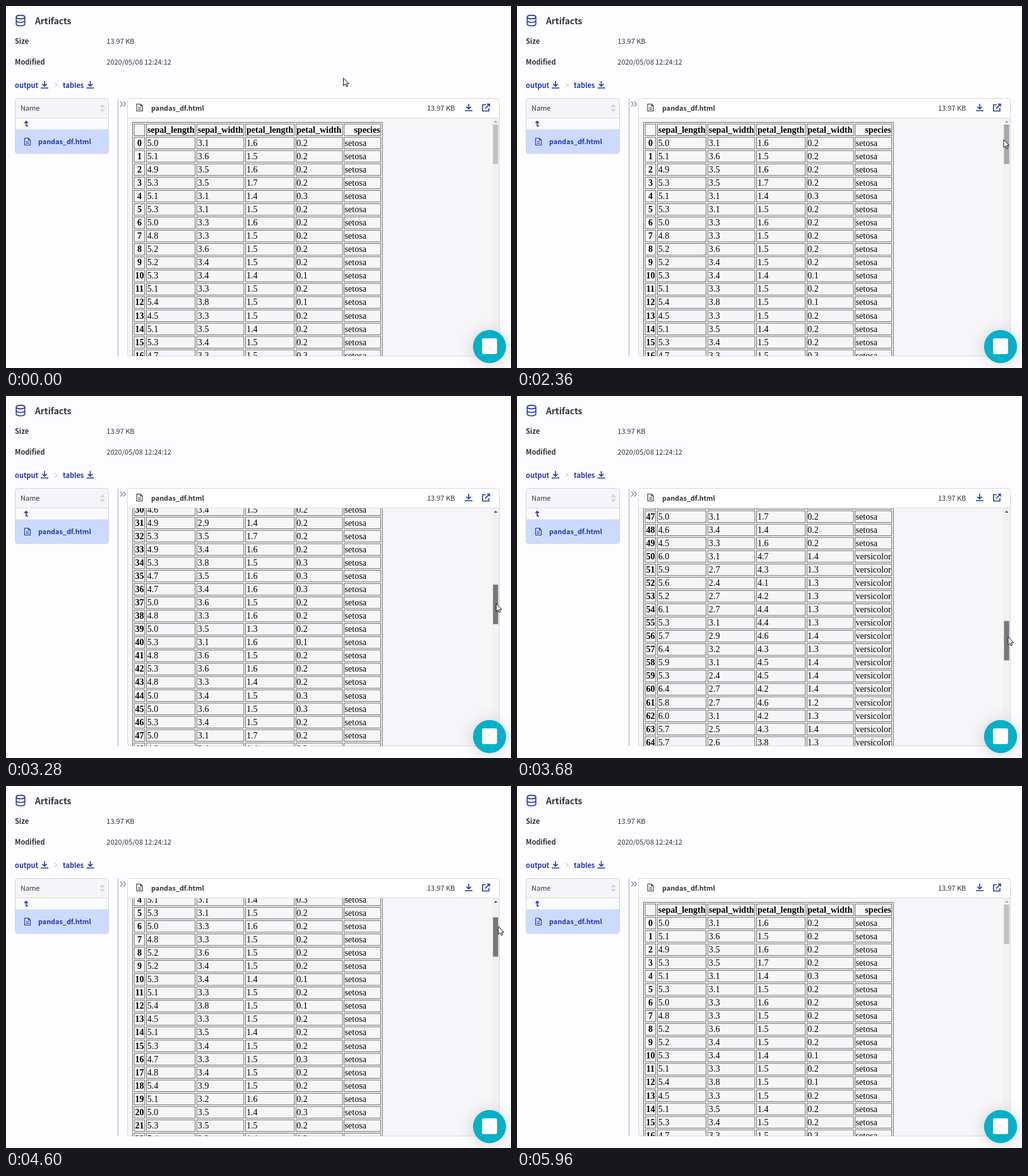
An HTML page that plays this animation: 800 px wide and 574 px high, repeating every 6000 ms.

```html
<!DOCTYPE html>
<html lang="en">
<head>
<meta charset="utf-8">
<title>Artifacts</title>
<style>
  html, body { margin: 0; width: 100%; height: 100%; overflow: hidden; background: #fdfdff; }
  body { position: relative; }
  svg { position: absolute; left: 0; top: 0; }
  text { font: 11px "Noto Sans CJK JP", "Noto Sans CJK SC", "Noto Sans CJK", "Noto Sans", sans-serif; fill: #33333b; }
  .bold { font-weight: 700; }
  .title { font-size: 13.8px; }
  .name { font-size: 10.8px; }
  .blue { fill: #2439ad; }
  .line { fill: none; stroke: #2439ad; stroke-width: 1.6; }
  .thin { stroke-width: 1.1; }
  .dark { stroke: #33333b; }
  #view { position: absolute; left: 193px; top: 178px; width: 577px; height: 377px; overflow: hidden; }
  table { position: absolute; left: 7.3px; top: 6px; transform-origin: 0 0; border: 1px solid #5c5c5c;
    border-spacing: 2px; font: 16px/18px "Liberation Serif", "Times New Roman", serif; color: #000; }
  th, td { border: 1px solid #5c5c5c; padding: 1px; white-space: nowrap; }
  thead th { text-align: right; }
</style>
</head>
<body>
<svg width="800" height="574">
  <defs>
    <path id="save" class="line" d="M0-6V2M-3.6-1.4 0 2.2 3.6-1.4M-6 5H6"/>
    <path id="file" d="M-4.5-5.5H1.5L4.5-2.5V5.5H-4.5ZM1.5-5.5V-2.5H4.5M-2.3 0H2.3M-2.3 2.6H2.3"/>
    <filter id="soft" x="-100%" y="-100%" width="300%" height="300%"><feGaussianBlur stdDeviation="13"/></filter>
  </defs>

  <g class="line">
    <ellipse cx="23" cy="17.5" rx="6.8" ry="2.9"/>
    <path d="M16.2 17.5V28.5C16.2 32.4 29.8 32.4 29.8 28.5V17.5M16.2 23C16.2 26.9 29.8 26.9 29.8 23"/>
  </g>
  <text x="46" y="28.5" class="bold title">Artifacts</text>
  <text x="14" y="60" class="bold">Size</text>
  <text x="159.3" y="60">13.97 KB</text>
  <text x="14" y="93" class="bold">Modified</text>
  <text x="159.3" y="93">2020/05/08 12:24:12</text>
  <text x="14" y="129.5" class="bold blue">output</text>
  <use href="#save" x="61" y="125"/>
  <path d="M77 122.5 81.5 125.5 77 128.5" fill="none" stroke="#b9b9c2"/>
  <text x="90" y="129.5" class="bold blue">tables</text>
  <use href="#save" x="133.5" y="125"/>

  <path d="M14.5 177.5V150.5Q14.5 146.5 18.5 146.5H158.5Q162.5 146.5 162.5 150.5V177.5Z" fill="#f5f5f7"/>
  <rect x="14.5" y="177.5" width="148" height="19" fill="#fafafc"/>
  <path d="M14.5 196H162.5V230Q162.5 234 158.5 234H18.5Q14.5 234 14.5 230Z" fill="#ccdaff"/>
  <rect x="14.5" y="146.5" width="148" height="87.5" rx="4" fill="none" stroke="#d3d3da"/>
  <path d="M14.5 177.5H162.5M14.5 196H162.5" stroke="#dcdce3"/>
  <text x="23" y="165.5">Name</text>
  <path d="M148.5 160.5 152.7 156 157 160.5ZM148.5 163.5 152.7 168 157 163.5Z" fill="#d2d2d8"/>
  <path class="line" d="M35 190.2H32V183M29.3 185.6 32 182.9 34.7 185.6"/>
  <use href="#file" x="34" y="215" class="line thin"/>
  <text x="51" y="219" class="bold name blue">pandas_df.html</text>

  <path d="M177.5 147V555" stroke="#aaaab0"/>
  <path d="M181 151.5 184.5 155.5 181 159.5M186 151.5 189.5 155.5 186 159.5" fill="none" stroke="#85858d" stroke-width="1.2"/>

  <rect x="192.5" y="146.5" width="589" height="408.5" rx="4" fill="#f6f6f8"/>
  <path d="M192.5 177.5V150.5Q192.5 146.5 196.5 146.5H777.5Q781.5 146.5 781.5 150.5V177.5Z" fill="#fff"/>
  <path d="M192.5 177.5H781.5" stroke="#dcdce2"/>
  <use href="#file" x="211.5" y="161" class="line thin dark"/>
  <text x="230" y="165.5" class="bold name">pandas_df.html</text>
  <text x="667" y="165.5">13.97 KB</text>
  <use href="#save" x="733" y="161"/>
  <path class="line" d="M760 156.5H755V166.5H765V162M759 162.5 766 155.5M762 155.5H766V159.5"/>

  <rect x="770" y="178" width="11" height="377" fill="#f1f1f2"/>
  <path id="up" d="M773 185 775.7 181.8 778.5 185Z"/>
  <rect id="thumb" x="771.5" width="8.2" height="62.5"/>
  <rect x="192.5" y="146.5" width="589" height="408.5" rx="4" fill="none" stroke="#d8d8de"/>

  <circle cx="766" cy="542" r="26" opacity=".17" filter="url(#soft)"/>
  <circle cx="766" cy="540" r="26.2" fill="#04b0c9"/>
  <rect x="754" y="527" width="24" height="25" rx="3" fill="#fff"/>
</svg>

<div id="view"><table></table></div>

<svg width="800" height="574">
  <path id="cursor" d="M0 0V12.5L2.9 9.8 4.8 14 6.8 13.1 5 9.1H8.8Z" fill="#fff" stroke="#111"/>
</svg>

<script>
const SCALE = 0.8776, LOOP = 6000, RATIO = 6.02;
const $ = id => document.getElementById(id);
const table = document.querySelector('table');

// mean and spread of each measured column
const setosa = { name: 'setosa', stats: [[5, .5], [3.4, .5], [1.5, .2], [.22, .1]] };
const versicolor = { name: 'versicolor', stats: [[5.9, .8], [2.8, .5], [4.3, .6], [1.3, .2]] };

let seed = 7;
const rand = () => (seed = seed * 16807 % 2147483647) / 2147483647;
const vary = ([mean, spread]) => (mean + (rand() + rand() - 1) * spread).toFixed(1);
const wrap = (tag, items) => items.map(s => `<${tag}>${s}</${tag}>`).join('');

function row(i) {
  const { name, stats } = i < 50 ? setosa : versicolor;
  return `<tr><th>${i}</th>${wrap('td', [...stats.map(vary), name])}</tr>`;
}

const heads = ['', 'sepal_length', 'sepal_width', 'petal_length', 'petal_width', 'species'];
table.innerHTML = `<thead><tr>${wrap('th', heads)}</tr></thead>
  <tbody>${Array.from({ length: 100 }, (_, i) => row(i)).join('')}</tbody>`;

// key points: time, then values
const pointer = [
  [700, 534.5, 114], [1320, 624, 300], [1960, 733, 260], [2360, 771, 212], [2520, 771, 212],
  [2920, 775, 276], [3640, 778, 382], [3800, 778, 382], [4120, 780, 342], [4600, 780, 223], [4740, 780, 207]
];
const scroll = [[2560, 0], [2920, 320], [3640, 1016], [3880, 1016], [4120, 850.5], [4600, 122], [4740, 0]];

function at(keys, t) {
  const i = keys.findIndex(k => k[0] > t);
  if (i < 1) return keys.at(i).slice(1);
  const [t0, ...a] = keys[i - 1], [t1, ...b] = keys[i];
  return a.map((v, n) => v + (b[n] - v) * (t - t0) / (t1 - t0));
}

function draw(now) {
  const t = now % LOOP;
  const [x, y] = at(pointer, t);
  const [top] = at(scroll, t);
  const held = t > 2520 && t < 5080, shown = t < 5400;
  const hover = t > 2340 && shown;

  table.style.transform = `translateY(${-top}px) scale(${SCALE})`;
  $('thumb').setAttribute('y', 188 + top / RATIO);
  $('thumb').setAttribute('fill', held ? '#787878' : hover ? '#a8a8a8' : '#c1c1c1');
  $('up').setAttribute('fill', top ? '#505050' : '#a3a3a3');
  $('cursor').setAttribute('transform', `translate(${x} ${y})`);
  $('cursor').setAttribute('visibility', shown ? 'visible' : 'hidden');
  requestAnimationFrame(draw);
}
requestAnimationFrame(draw);
</script>
</body>
</html>
```
